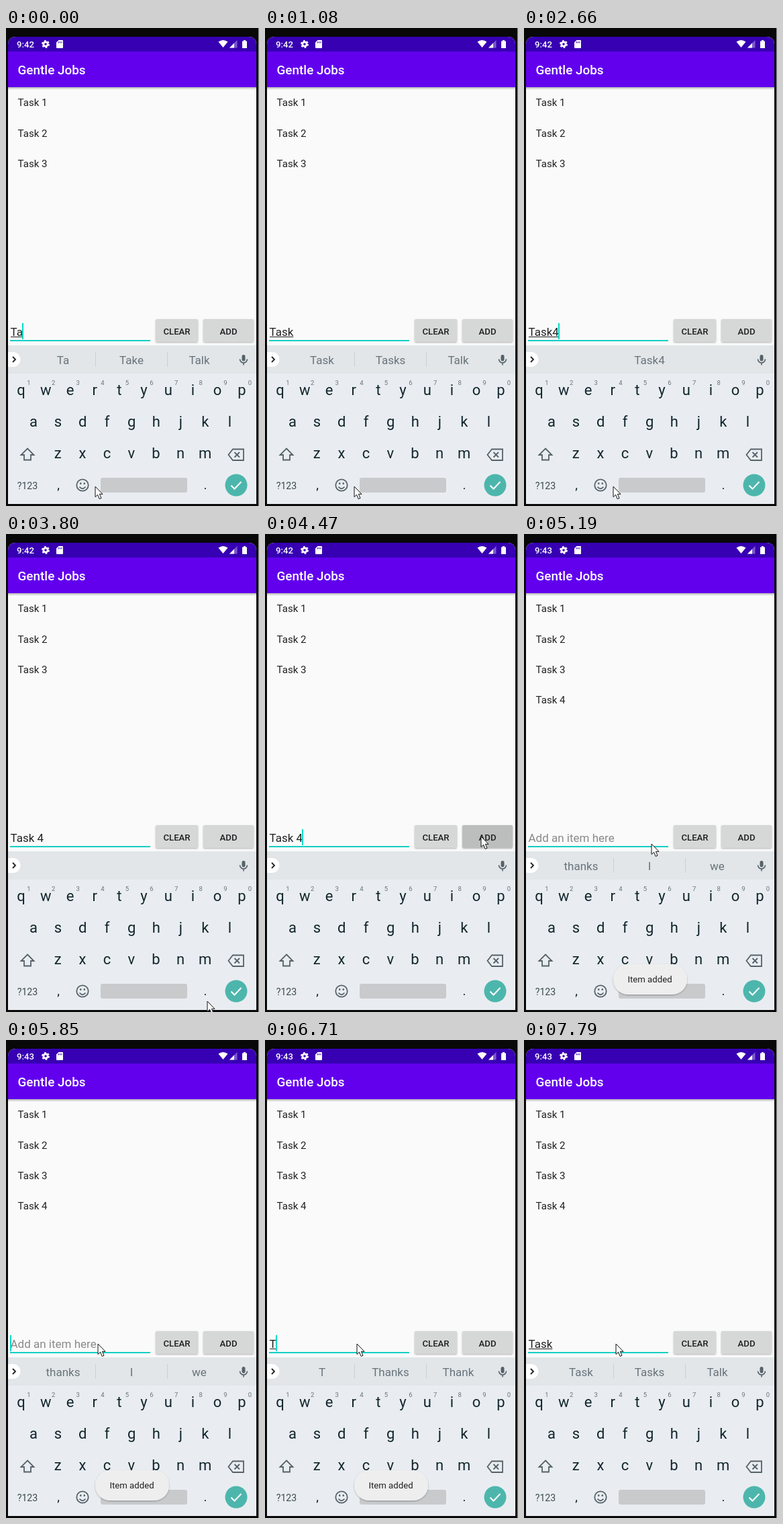
Write an HTML page that moves like this. It is 377x711 px and loops after 8000 ms.

```html
<!DOCTYPE html>
<html lang="en">
<head>
<meta charset="utf-8">
<style>
html, body { margin: 0; width: 100%; height: 100%; overflow: hidden; background: #080808; }
svg { display: block; width: 377px; height: 711px; }
text { font-family: Roboto, Arial, sans-serif; white-space: pre; fill: #202122; }
.mid { text-anchor: middle; }
.bold { font-weight: 500; }
.line { fill: none; stroke: #566269; stroke-width: 1.8; }
</style>
</head>
<body>
<svg viewBox="0 0 377 711">
  <defs>
    <linearGradient id="shade" x2="0" y2="1">
      <stop stop-color="#000" stop-opacity=".28"/><stop offset="1" stop-color="#000" stop-opacity="0"/>
    </linearGradient>
    <filter id="lift" x="-20%" y="-20%" width="140%" height="150%">
      <feDropShadow dx="0" dy="1" stdDeviation="1" flood-opacity=".3"/>
    </filter>
    <clipPath id="screen"><path d="M3 708V25Q3 13 15 13H361Q373 13 373 25V708Z"/></clipPath>
  </defs>
  <rect width="377" height="711" fill="#080808"/>
  <rect x="376" width="1" height="711" fill="#999"/>
  <g clip-path="url(#screen)">
    <rect y="13" width="377" height="700" fill="#fafafa"/>
    <rect y="13" width="377" height="22" fill="#3700b3"/>
    <rect y="35" width="377" height="53" fill="#6200ee"/>
    <rect y="88" width="377" height="4" fill="url(#shade)"/>

    <!-- status icons -->
    <g fill="#fff">
      <circle cx="59" cy="24" r="3.2" fill="none" stroke="#fff" stroke-width="2.8"/>
      <circle cx="59" cy="24" r="5" fill="none" stroke="#fff" stroke-width="2" stroke-dasharray="2.6 2.636"/>
      <path d="M78.5 18H84Q85 18 85 19V29Q85 30 84 30H76Q75 30 75 29V21.5Z"/>
      <path d="M78.5 20v2.5M80.7 20v2.5M82.9 20v2.5" stroke="#3700b3"/>
      <path d="M316.500 20.500Q323.500 15.500 330.500 20.500L323.500 29Z"/>
      <path d="M333 29.500L344.500 18V29.500Z" opacity=".35"/>
      <path d="M333 29.500L340 22.500V29.500Z"/>
      <path d="M352 19.500H354V18H357V19.500H359V30H352Z"/>
    </g>
    <text id="clock" class="bold" x="16" y="28.700" font-size="13.2" style="fill:#fff"/>
    <text class="bold" x="17.500" y="69" font-size="18.9" style="fill:#fff">Gentle Jobs</text>
    <g id="tasks" font-size="15.1"></g>

    <!-- input row -->
    <text id="entry" x="6.500" y="458" font-size="17"/>
    <rect id="under" x="7" y="459" height="1" fill="#222"/>
    <rect x="6" y="464" width="209" height="2" fill="#12d0c2"/>
    <rect id="caret" y="439" width="2" height="24" fill="#03dac5"/>
    <g filter="url(#lift)">
      <rect x="223" y="433" width="63" height="34" rx="2" fill="#d6d7d7"/>
      <rect x="294" y="433" width="75" height="34" rx="2" fill="#d6d7d7"/>
    </g>
    <rect id="press" x="294" y="433" width="75" height="34" rx="2"/>
    <text class="mid bold" x="254.500" y="455.500" font-size="13.2">CLEAR</text>
    <text class="mid bold" x="331.500" y="455.500" font-size="13.2">ADD</text>

    <!-- keyboard -->
    <rect y="472" width="377" height="42" fill="#e2e6e9"/>
    <rect y="514" width="377" height="197" fill="#e9edf1"/>
    <path d="M3 482H10.500A11 11 0 0 1 10.500 504H3Z" fill="#fff"/>
    <path d="M10 489l4 4l-4 4" class="line" style="stroke:#222"/>
    <path id="bars" d="M133.500 482V504M240.500 482V504" stroke="#cbd0d4"/>
    <g id="hints" font-size="17"></g>
    <g stroke="#566269" fill="none" stroke-width="1.6">
      <rect x="351.500" y="486" width="5" height="9.500" rx="2.500" fill="#566269" stroke="none"/>
      <path d="M348.500 492.500a5.500 5.500 0 0 0 11 0M354 498V501.500"/>
    </g>
    <g id="keys"></g>
    <path class="line" d="M32 625.500L41.500 635H37V642.500H27V635H22.500Z"/>
    <path class="line" d="M338 626.500H354V643H338L331.500 634.800ZM340.500 631l7.500 7.500M348 631l-7.500 7.500"/>
    <g class="line">
      <circle cx="114" cy="680" r="8.700"/>
      <path d="M109.500 682.500Q114 688 118.500 682.500"/>
      <path d="M110 677.500h2.400M115.600 677.500h2.400" stroke-width="2.400"/>
    </g>
    <rect x="141" y="669" width="129" height="22" rx="3" fill="#c8cacc"/>
    <circle cx="343" cy="680" r="16.500" fill="#4db6ac"/>
    <path d="M335.500 680.500l5 5l10-10.500" fill="none" stroke="#fff" stroke-width="2"/>

    <g id="toast">
      <rect x="133" y="640" width="110" height="45" rx="22" fill="#eee" filter="url(#lift)"/>
      <text class="mid" x="187.500" y="667" font-size="13.2">Item added</text>
    </g>
  </g>
  <path id="mouse" d="M0 0V15.500L3.600 12.200L6.200 18.500L9 17.300L6.400 11.300H11Z" fill="#fff" stroke="#111"/>
</svg>
<script>
const $ = id => document.getElementById(id);
const LOOP = 8000;
const HINT = 'Add an item here';

function addText(parent, str, x, y, size, color) {
  const el = document.createElementNS('http://www.w3.org/2000/svg', 'text');
  el.textContent = str;
  el.setAttribute('x', x);
  el.setAttribute('y', y);
  if (size) el.setAttribute('font-size', size);
  if (color) el.style.fill = color;
  parent.append(el);
  return el;
}

const tasks = [1, 2, 3, 4].map(n => addText($('tasks'), 'Task ' + n, 17.5, 116.4 + 45.2 * (n - 1)));
const words = [85, 187, 288].map(x => addText($('hints'), '', x, 500, 0, '#68737a'));
words.forEach(el => el.setAttribute('class', 'mid'));

function addKey(str, x, y, size, color = '#12262d') {
  addText($('keys'), str, x, y, size, color).setAttribute('class', 'mid');
}
[['qwertyuiop', 22.6, 546], ['asdfghjkl', 41, 593], ['zxcvbnm', 77.3, 640]].forEach(([row, x, y]) =>
  [...row].forEach((c, i) => addKey(c, x + 36.55 * i, y, 22)));
[...'1234567890'].forEach((c, i) => addKey(c, 34 + 36.6 * i, 530.5, 9.5, '#68737a'));
addKey('?123', 32, 685.5, 14.2, '#3c4a51');
addKey(',', 78, 686, 19);
addKey('.', 297, 686, 19);

// time, typed text, suggestions, underlined while composing
const typing = [
  [0, 'Ta', 'Ta Take Talk', 1],
  [250, 'Tas', 'Tas Task Tasks', 1],
  [650, 'Task', 'Task Tasks Talk', 1],
  [1670, 'Task4', ' Task4 ', 1],
  [2940, 'Task', ' Task ', 1],
  [3060, 'Task ', 'is and for', 0],
  [3350, 'Task 4', '', 0],
  [4710, '', '', 0],
  [4950, '', 'thanks I we', 0],
  [6710, 'T', 'T Thanks Thank', 1],
  [6860, 'Ta', 'Ta Take Talk', 1],
  [7100, 'Tas', 'Tas Task Tasks', 1],
  [7250, 'Task', 'Task Tasks Talk', 1]
];
const caretOff = [[1080, 1670], [2100, 2660], [3800, 4350], [5190, 5700], [6120, 6710], [7790, LOOP]];
const mousePath = [
  [0, 133, 682], [3800, 300, 695], [3930, 274, 531], [4080, 292, 478], [4200, 318, 446],
  [4350, 322, 450], [4590, 324, 454], [4710, 327, 464], [4830, 330, 474], [4950, 270, 470],
  [5070, 216, 465], [5190, 190, 461], [5340, 165, 457], [5460, 150, 455], [5580, 142, 453], [5700, 137, 452]
];
const toastFade = [[0, 0], [4830, .1], [4950, .6], [5070, 1], [6860, .7], [6980, .3], [7100, 0]];
const taskFade = [[0, 0], [4710, .3], [4830, .75], [4950, 1]];
const pressFade = [[0, 0], [4350, .06], [4470, .12], [4590, .1], [4710, .06], [4830, .02], [4950, 0]];

// the screen was sampled, so values hold until the next key
const at = (keys, t) => keys.findLast(k => k[0] <= t);

function draw(t) {
  const [, typed, list, composing] = at(typing, t);
  const entry = $('entry');
  entry.textContent = typed || HINT;
  entry.style.fill = typed ? '#202122' : '#8a8a8a';
  const width = typed ? entry.getComputedTextLength() : 0;
  $('under').setAttribute('width', composing ? Math.max(0, width - .5) : 0);
  $('caret').setAttribute('x', Math.round(5.6 + width));
  $('caret').setAttribute('opacity', caretOff.some(([a, b]) => t >= a && t < b) ? 0 : 1);

  const parts = list.split(' ');
  words.forEach((el, i) => el.textContent = parts[i] || '');
  $('bars').setAttribute('opacity', parts[0] ? 1 : 0);

  $('clock').textContent = t < 4590 ? '9:42' : '9:43';
  tasks[3].setAttribute('opacity', at(taskFade, t)[1]);
  $('toast').setAttribute('opacity', at(toastFade, t)[1]);
  $('press').setAttribute('opacity', at(pressFade, t)[1]);
  const [, x, y] = at(mousePath, t);
  $('mouse').setAttribute('transform', `translate(${x} ${y})`);
}

function tick() {
  draw(performance.now() % LOOP);
  requestAnimationFrame(tick);
}
tick();
</script>
</body>
</html>
```
